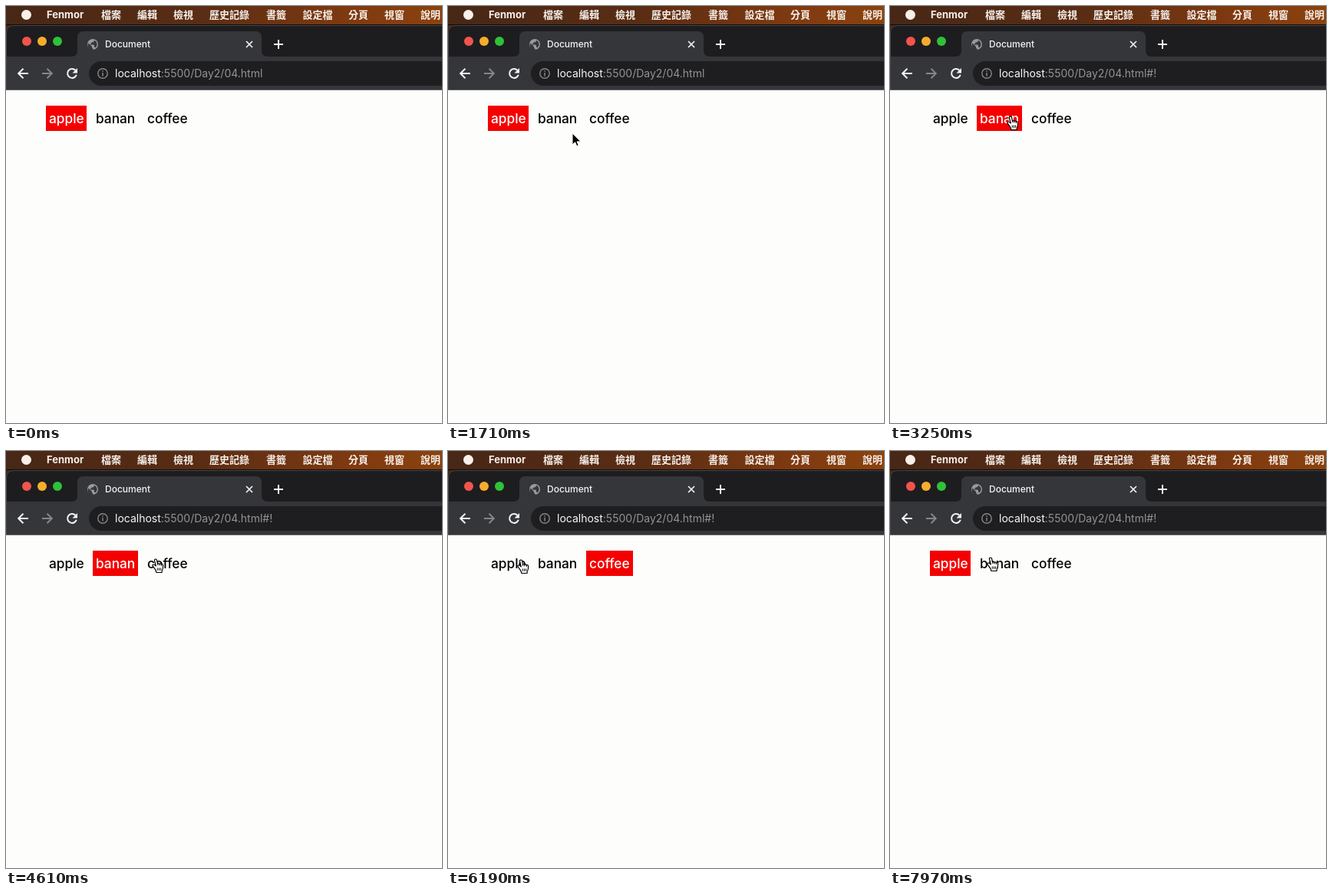
Write an HTML page that moves like this. It is 568x544 px and loops after 7990 ms.

```html
<!DOCTYPE html>
<html lang="zh-Hant">
<head>
<meta charset="utf-8">
<title>Document</title>
<style>
  html, body { margin: 0; width: 100%; height: 100%; overflow: hidden; background: #fdfdfb; }
  svg { display: block; font-family: Inter, sans-serif; }
  .menu { font: 700 13px "Noto Sans CJK TC", "Noto Sans CJK", sans-serif; fill: #f8f0ea; }
  .menu .app { font: 700 13px Inter, sans-serif; }
  .icon { fill: none; stroke: #f4f4f6; stroke-width: 2; }
  .dim { stroke: #85868a; }
  .link { font-size: 17.3px; font-weight: 500; }
</style>
</head>
<body>
<svg width="568" height="544" viewBox="0 0 568 544">
  <defs>
    <linearGradient id="desktop">
      <stop offset="0" stop-color="#472716"/>
      <stop offset=".45" stop-color="#5a2d14"/>
      <stop offset=".8" stop-color="#803a10"/>
      <stop offset="1" stop-color="#8a420e"/>
    </linearGradient>
  </defs>
  <rect width="568" height="544" fill="#fdfdfb"/>

  <!-- menu bar -->
  <rect width="568" height="34" fill="url(#desktop)"/>
  <rect y="24" width="568" height="1" fill="#100a06"/>
  <circle cx="26.5" cy="11.5" r="6.5" fill="#f8f0ea"/>
  <g class="menu" id="menu"><text class="app" x="53" y="16">Fenmor</text></g>

  <!-- browser window -->
  <path d="M0 110V35Q0 25 10 25H568V110Z" fill="#1d1d20"/>
  <path d="M.5 110V35Q.5 25.5 10 25.5H568" fill="none" stroke="#47474b"/>
  <path d="M1 66H85Q93 66 93 58V41Q93 33 101 33H325Q333 33 333 41V58Q333 66 341 66H568V110H1Z" fill="#35363a"/>
  <rect y="109" width="568" height="1" fill="#6c6c70"/>
  <path d="M568 72H124a16 16 0 0 0 0 32H568Z" fill="#1e1e21"/>
  <circle cx="27" cy="46" r="6" fill="#f2544b"/>
  <circle cx="47" cy="46" r="6" fill="#f6ad2c"/>
  <circle cx="67" cy="46" r="6" fill="#2fc138"/>

  <circle cx="113" cy="50" r="7" fill="#97999d"/>
  <path d="M107.5 48.5l4.5 4.5v1.5l1.5 1.5v1.6a6 6 0 0 1-6-9.1zM115 44.8a5.6 5.6 0 0 1 1.6 9.4l-1.6-.8v-2l-1-1h-4v-1.6h1.6v-1.6h2l1-1z" fill="#35363a"/>
  <text x="129" y="54" font-size="12" font-weight="500" fill="#f4f4f6">Document</text>
  <path class="icon" d="M313 46l8 8M321 46l-8 8" style="stroke-width:1.7"/>
  <path class="icon" d="M349 50h12M355 44v12"/>

  <path class="icon" d="M29 88H16.5M22.5 81.7L16.2 88L22.5 94.3"/>
  <path class="icon dim" d="M47 88H59.5M53.5 81.7L59.8 88L53.5 94.3"/>
  <path class="icon" d="M90.4 83.7A6 6 0 1 0 91.8 89.8"/>
  <path d="M93 81v6.5h-6.5z" fill="#f4f4f6"/>
  <circle class="icon dim" cx="126" cy="88" r="6.2" style="stroke-width:1.4"/>
  <path class="icon dim" d="M126 87v4.5M126 84.2v1.6" style="stroke-width:1.5"/>
  <text x="142" y="93" font-size="14" fill="#929396"><tspan fill="#f8f8fa">localhost</tspan>:5500/Day2/04.html<tspan id="hash"></tspan></text>

  <!-- page -->
  <g id="links"></g>
  <g id="cursor">
    <path id="arrow" d="M0 0V15l3.5-3.3 2.3 5 2.4-1-2.2-4.8h5z" fill="#000" stroke="#fff"/>
    <g id="hand" stroke="#000" stroke-width="1.2" stroke-linejoin="round" fill="#fff">
      <path d="M0 0C-1.3 0-1.7 1-1.5 2L.3 9L-1.4 7.6C-3 6.3-4.8 7.5-3.8 9L-.2 14.2L1 17.5H8L8.3 15C9.5 13 9.8 11 9.6 8C9.5 6.5 7.8 6.4 7.3 7.2C7 5.8 5.3 5.5 4.6 6.5C4 5.4 3 5.2 2.4 5.8L1.6 1.4C1.4 .4 .8 0 0 0Z"/>
      <path d="M2.4 5.8L2.9 8M4.6 6.5L5 8.4M7.3 7.2L7.4 9M2.3 11.5v3.3M4.5 11.5v3.3M6.6 11.5v3.3" fill="none" stroke-width="1"/>
    </g>
  </g>
</svg>
<script>
const LOOP = 7990;
const $ = id => document.getElementById(id);

function add(parent, tag, attrs, text = '') {
  const el = document.createElementNS('http://www.w3.org/2000/svg', tag);
  for (const key in attrs) el.setAttribute(key, attrs[key]);
  el.textContent = text;
  parent.append(el);
  return el;
}

const menuItems = {
  檔案: 124, 編輯: 171, 檢視: 218, 歷史記錄: 265, 書籤: 339,
  設定檔: 386.5, 分頁: 446, 視窗: 493, 說明: 540
};
for (const label in menuItems) add($('menu'), 'text', { x: menuItems[label], y: 16 }, label);

const links = [['apple', 52, 53], ['banan', 113, 59], ['coffee', 180, 61]].map(([label, x, width]) => ({
  x, width,
  box: add($('links'), 'rect', { x, y: 130, width, height: 33, fill: '#f40000' }),
  text: add($('links'), 'text', { class: 'link', x: x + 4, y: 153 }, label)
}));

// [time, selected link]
const clicks = [[0, 0], [2900, 1], [5200, 2], [6550, 0]];

// Pointer hotspot: [time, x, y]
const path = [
  [1250, 245, 430], [1570, 163, 170], [2050, 157, 149], [2560, 157, 149],
  [2850, 157, 144], [4150, 157, 144], [4600, 195, 141], [5500, 195, 141],
  [6050, 95, 142], [6850, 95, 142], [7400, 131, 139], [LOOP, 131, 139]
];

function pointerAt(t) {
  const i = path.findIndex(p => p[0] > t);
  const [t0, x0, y0] = path[i - 1], [t1, x1, y1] = path[i];
  const u = (t - t0) / (t1 - t0), k = u * u * (3 - 2 * u);
  return [x0 + (x1 - x0) * k, y0 + (y1 - y0) * k];
}

const show = (el, on) => el.setAttribute('visibility', on ? 'visible' : 'hidden');

function draw(now) {
  const t = now % LOOP;
  const selected = clicks.filter(c => c[0] <= t).pop()[1];
  links.forEach((link, i) => {
    show(link.box, i === selected);
    link.text.setAttribute('fill', i === selected ? '#fff' : '#000');
  });
  $('hash').textContent = t >= clicks[1][0] ? '#!' : '';

  const visible = t >= path[0][0];
  const [x, y] = visible ? pointerAt(t) : [0, 0];
  const overLink = y >= 130 && y < 163 && links.some(l => x >= l.x && x < l.x + l.width);
  $('cursor').setAttribute('transform', `translate(${Math.round(x)} ${Math.round(y)})`);
  show($('hand'), visible && overLink);
  show($('arrow'), visible && !overLink);
  requestAnimationFrame(draw);
}
draw(0);
</script>
</body>
</html>
```
